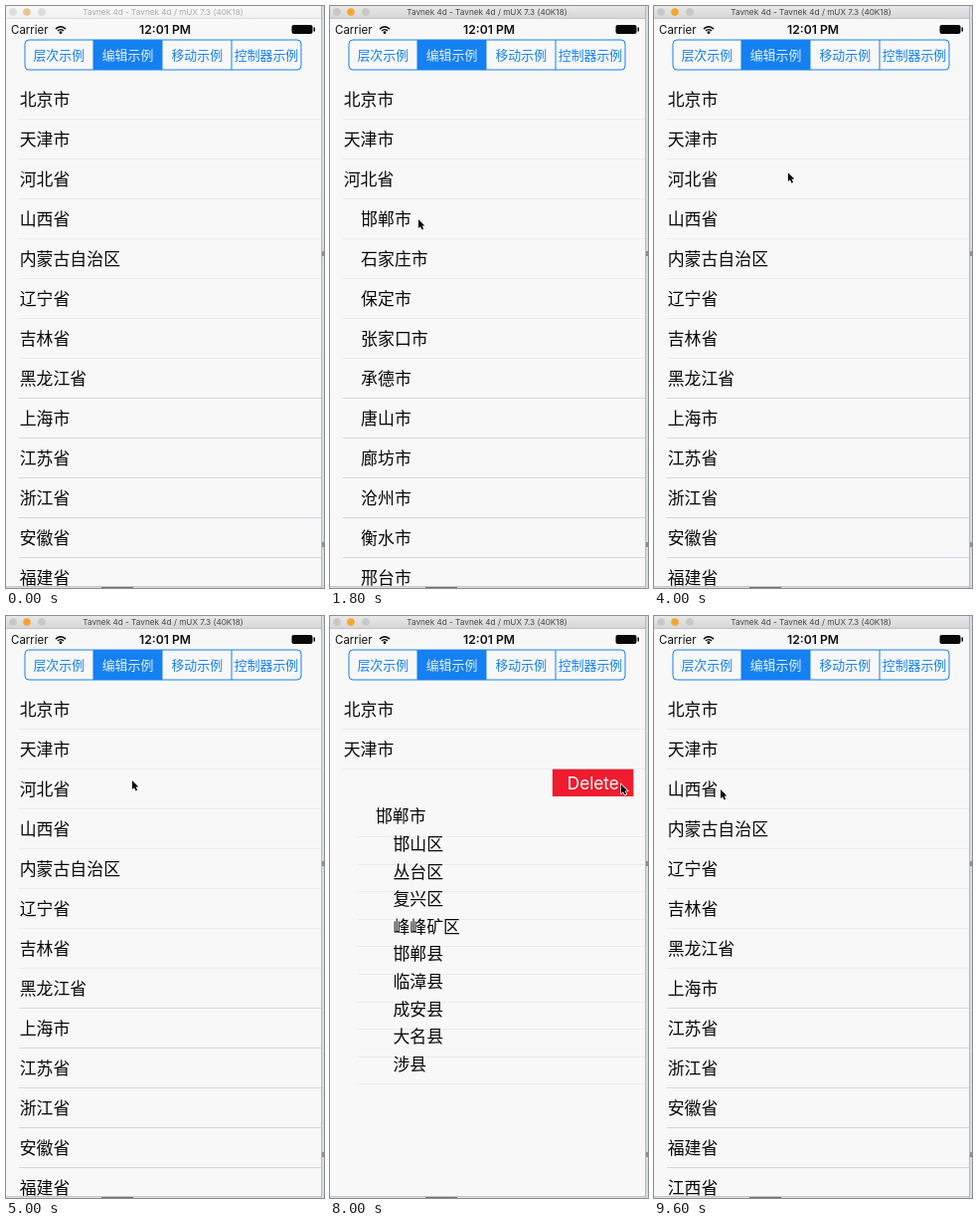
An HTML page with a canvas that plays this animation: 320 by 584 pixels, repeating every 9800 ms.

```html
<!DOCTYPE html>
<html lang="zh-CN">
<head>
<meta charset="utf-8">
<style>
html, body { margin: 0; width: 100%; height: 100%; overflow: hidden; background: #f8f8f8; }
canvas { display: block; width: 320px; height: 584px; }
</style>
</head>
<body>
<canvas id="stage"></canvas>
<script>
const W = 320, H = 584, LOOP = 9800, STEP = 200;
const ROW = 40, LIST_TOP = 73, EDGE = 317;
const BLUE = '#1580f2';
const CJK = '"Noto Sans CJK SC", "Noto Sans CJK", sans-serif';
const LATIN = 'Inter, "Liberation Sans", sans-serif';

const canvas = document.getElementById('stage');
const ratio = window.devicePixelRatio || 1;
canvas.width = W * ratio;
canvas.height = H * ratio;
const ctx = canvas.getContext('2d');
ctx.scale(ratio, ratio);

const provinces = ('北京市 天津市 河北省 山西省 内蒙古自治区 辽宁省 吉林省 黑龙江省 上海市 ' +
  '江苏省 浙江省 安徽省 福建省 江西省 山东省').split(' ');
const cities = '邯郸市 石家庄市 保定市 张家口市 承德市 唐山市 廊坊市 沧州市 衡水市 邢台市 秦皇岛市'.split(' ');
const districts = ('邯山区 丛台区 复兴区 峰峰矿区 邯郸县 临漳县 成安县 大名县 涉县 磁县 ' +
  '肥乡县 永年县 邱县 鸡泽县 广平县 馆陶县 魏县 曲周县').split(' ');

const level = (names, depth) => names.map(name => ({ name, depth }));
const head = level(provinces.slice(0, 2), 0);
const hebei = level(['河北省'], 0);
const tail = level(provinces.slice(3), 0);
const handan = level(cities.slice(0, 1), 1);
const otherCities = level(cities.slice(1), 1);
const handanParts = level(districts, 2);
const cityRows = [...handan, ...otherCities];
const openRows = [...handan, ...handanParts, ...otherCities];

// Pointer path: time, x, y
const path = [
  [200, 150, 300], [1000, 78, 170], [1400, 78, 170], [1800, 89, 214], [2200, 92, 214],
  [3000, 144, 167], [3600, 138, 168], [5000, 127, 165], [5400, 130, 168], [6200, 243, 204],
  [6600, 240, 172], [7200, 158, 172], [7400, 190, 172], [7800, 293, 169], [8000, 293, 169],
  [8600, 220, 180], [9600, 67, 174]
];

// Piecewise linear value of one column of a keyed track
function track(keys, t, col) {
  let i = 1;
  while (i < keys.length - 1 && keys[i][0] < t) i++;
  const a = keys[i - 1], b = keys[i];
  const u = Math.min(1, Math.max(0, (t - a[0]) / (b[0] - a[0])));
  return a[col] + (b[col] - a[col]) * u;
}

function box(x, y, w, h, color) {
  ctx.fillStyle = color;
  ctx.fillRect(x, y, w, h);
}

function disc(x, y, r, color) {
  ctx.fillStyle = color;
  ctx.beginPath();
  ctx.arc(x, y, r, 0, Math.PI * 2);
  ctx.fill();
}

function label(text, x, y, font, color, align = 'left') {
  ctx.font = font;
  ctx.fillStyle = color;
  ctx.textAlign = align;
  ctx.fillText(text, x, y);
}

function drawRow(row, top, shift = 0, line = true) {
  if (top > H || top < 0) return;
  label(row.name, 13.7 + row.depth * 17.4 + shift, top + 26.3, '16.9px ' + CJK, '#080808');
  const y = Math.round(top + ROW);
  const x = Math.max(0, 13 + shift);
  if (line) box(x, y, EDGE - x, 1, y > 380 && !shift ? '#d0d8dd' : '#e9ebec');
}

// Rows are stacked at the given pitch; only as many as fit at full height
// are drawn. Returns the next free y.
function drawRows(rows, top, pitch = ROW, shift = 0) {
  const visible = Math.max(0, Math.round((H - top) / ROW));
  rows.slice(0, visible).forEach((row, i) => drawRow(row, top + i * pitch, shift));
  return top + rows.length * pitch;
}

function drawDelete(x, top, height) {
  ctx.save();
  ctx.beginPath();
  ctx.rect(x, top, Math.min(82, EDGE - x), height);
  ctx.clip();
  box(x, top, 82, height, '#ee1c2e');
  label('Delete', x + 41.2, top + height / 2 + 6.6, '17.2px ' + LATIN, '#fff', 'center');
  ctx.restore();
}

// open: share of a full row height the inserted rows have
function listState(t) {
  if (t < 1200) return { rows: [], open: 0 };
  if (t < 1400) return { rows: cityRows, open: 0.6 };
  if (t < 2000) return { rows: cityRows, open: 1 };
  if (t < 2200) return { rows: openRows, open: 1, inner: 0.6 };
  if (t < 3400) return { rows: openRows, open: 1 };
  if (t < 3600) return { rows: openRows, open: 0.4 };
  if (t < 5200) return { rows: [], open: 0 };
  if (t < 5400) return { rows: openRows, open: 0.6 };
  if (t < 8000) return { rows: openRows, open: 1 };
  if (t < 8200) return { rows: openRows, open: 0.69, removing: true };
  return { rows: [], open: 0, removed: true };
}

function drawList(t) {
  const { rows, open, inner, removing, removed } = listState(t);
  let y = drawRows(head, LIST_TOP + 0.4);
  if (!removed) {
    const gone = removing ? 1 - open : 0;
    const swipe = t < 8200 ? track([[6600, 0], [7200, 81]], t, 1) : 0;
    const pitch = ROW * (1 - gone);
    drawRow(hebei[0], y, -swipe - gone * 40, !rows.includes(handanParts[0]));
    if (swipe) drawDelete(EDGE - swipe - gone * 40, y, pitch);
    y += pitch;
  }
  if (inner) {
    y = drawRows(handan, y);
    y = drawRows(handanParts, y, ROW * inner, 48 * (1 - inner));
    y = drawRows(otherCities, y);
  } else {
    y = drawRows(rows, y, ROW * open, 48 * (1 - open));
  }
  drawRows(tail, y);
}

function drawTitle(active) {
  const shade = ctx.createLinearGradient(0, 0, 0, 12);
  shade.addColorStop(0, active ? '#e8e8e8' : '#f8f8f8');
  shade.addColorStop(1, active ? '#d6d6d6' : '#f1f1f1');
  box(0, 0, EDGE, 12, shade);
  box(0, 12, EDGE, 1, active ? '#c4c4c4' : '#dedede');
  const dim = active ? '#c8c6c6' : '#dcdcdc';
  disc(7, 6, 3.8, dim);
  disc(21, 6, 3.8, active ? '#f6a52d' : '#e9c48e');
  disc(36, 6, 3.8, dim);
  label('Tavnek 4d - Tavnek 4d / mUX 7.3 (40K18)', 158, 9, '8.2px ' + LATIN,
    active ? '#444' : '#aaa', 'center');
}

function drawStatus() {
  label('Carrier', 5, 28, '11.5px ' + LATIN, '#111');
  label('12:01 PM', 160, 28, '600 12.2px ' + LATIN, '#111', 'center');
  ctx.strokeStyle = '#111';
  ctx.lineWidth = 1.6;
  for (const r of [3.8, 6.6]) {
    ctx.beginPath();
    ctx.arc(55, 27.5, r, -Math.PI * 0.77, -Math.PI * 0.23);
    ctx.stroke();
  }
  disc(55, 26.7, 1.4, '#111');
  ctx.fillStyle = '#080808';
  ctx.beginPath();
  ctx.roundRect(287.5, 19, 21, 9, 2);
  ctx.fill();
  box(309.5, 21.5, 1.5, 4, '#080808');
}

function drawTabs() {
  const stops = [19, 87.5, 157.5, 227, 297];
  box(stops[1], 34, stops[2] - stops[1], 30, BLUE);
  ctx.strokeStyle = BLUE;
  ctx.lineWidth = 1;
  ctx.beginPath();
  ctx.roundRect(19, 34, 278, 30, 4);
  ctx.moveTo(227, 34);
  ctx.lineTo(227, 64);
  ctx.stroke();
  ['层次示例', '编辑示例', '移动示例', '控制器示例'].forEach((name, i) =>
    label(name, (stops[i] + stops[i + 1]) / 2, 53.6, '12.9px ' + CJK, i === 1 ? '#e6f1fd' : BLUE, 'center'));
}

function drawFrame() {
  box(EDGE, 0, 1, H, '#b4b9c2');
  box(EDGE + 1, 0, 2, H, '#d6dcea');
  box(EDGE + 1, 246, 2, 5, '#8b8e92');
  box(EDGE + 1, 538, 2, 5, '#8b8e92');
  box(0, 582, EDGE, 1, '#c4c7ca');
  box(0, 583, EDGE, 1, '#dcdcdc');
  box(96, 583, 32, 1, '#78716c');
}

function drawPointer(x, y) {
  const shape = [[0, 0], [0, 9], [2, 7.2], [3.6, 10.6], [5.2, 9.8], [3.7, 6.6], [6.4, 6.4]];
  ctx.beginPath();
  shape.forEach(([dx, dy]) => ctx.lineTo(x + dx, y + dy));
  ctx.closePath();
  ctx.strokeStyle = '#fff';
  ctx.lineWidth = 1.4;
  ctx.stroke();
  ctx.fillStyle = '#0a0a0a';
  ctx.fill();
}

function draw(now) {
  const t = Math.floor((now % LOOP) / STEP) * STEP;
  box(0, 0, W, H, '#f8f8f8');
  drawList(t);
  drawTitle(t >= STEP);
  drawStatus();
  drawTabs();
  drawFrame();
  if (t >= STEP) drawPointer(track(path, t, 1), track(path, t, 2));
}

let start;
function tick(now) {
  start ??= now;
  draw(Math.max(0, now - start));
  requestAnimationFrame(tick);
}
draw(0);
requestAnimationFrame(tick);
</script>
</body>
</html>
```
